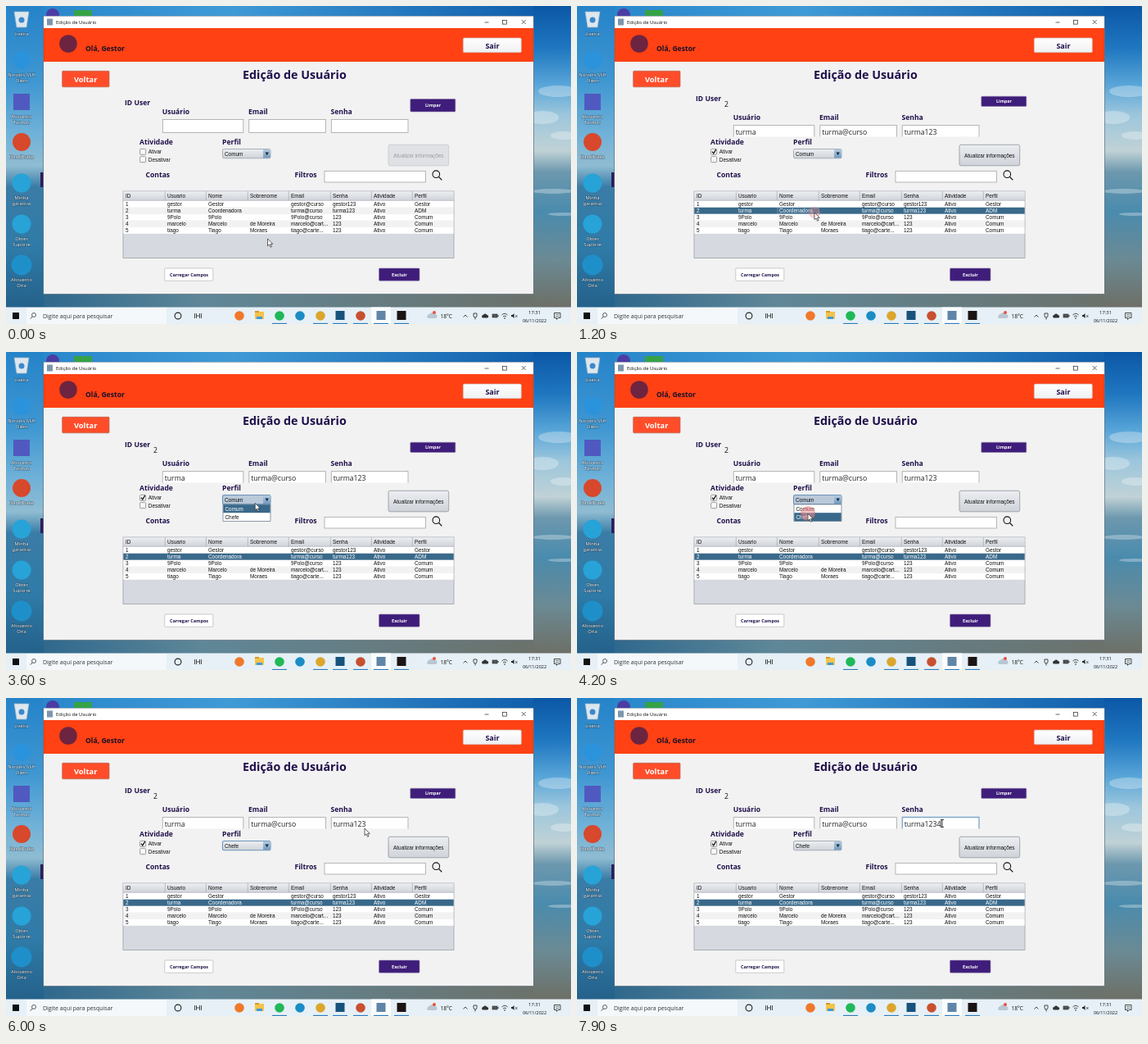
Animation of 690 by 388 pixels, one loop 8 s. Source, as an HTML page:

```html
<!DOCTYPE html>
<html lang="pt-BR">
<head>
<meta charset="utf-8">
<title>Edição de Usuário</title>
<style>
html, body { margin: 0; width: 100%; height: 100%; overflow: hidden; }
svg { display: block; width: 690px; height: 388px; }
text { font-family: "Open Sans", "Noto Sans", sans-serif; white-space: pre; }
.b { font-weight: bold; }
.s { font-family: "Liberation Sans", Arial, sans-serif; font-size: 6.4px; }
.m { text-anchor: middle; }
.d { text-anchor: middle; fill: #fff; font-size: 5.8px; paint-order: stroke; stroke: #1238; stroke-width: .9px; }
</style>
</head>
<body>
<svg viewBox="0 0 690 388">
  <defs>
    <linearGradient id="left" x2="0" y2="1">
      <stop stop-color="#2583c9"/><stop offset=".25" stop-color="#3f97d2"/>
      <stop offset=".42" stop-color="#6fb1d8"/><stop offset=".53" stop-color="#8fbcd2"/>
      <stop offset=".6" stop-color="#3a7ca6"/><stop offset=".8" stop-color="#2f7ba8"/>
      <stop offset="1" stop-color="#24618a"/>
    </linearGradient>
    <linearGradient id="right" x2="0" y2="1">
      <stop stop-color="#0b57a6"/><stop offset=".14" stop-color="#1f77c0"/>
      <stop offset=".26" stop-color="#58a5d8"/><stop offset=".36" stop-color="#9cc6dc"/>
      <stop offset=".48" stop-color="#c0d2d6"/><stop offset=".55" stop-color="#6d98ae"/>
      <stop offset=".68" stop-color="#4a8bad"/><stop offset=".84" stop-color="#6b8a94"/>
      <stop offset="1" stop-color="#6d6f66"/>
    </linearGradient>
    <linearGradient id="sky"><stop stop-color="#2583c9"/><stop offset=".4" stop-color="#3f9ad6"/><stop offset="1" stop-color="#0b57a6"/></linearGradient>
    <linearGradient id="shore"><stop stop-color="#24618a"/><stop offset=".35" stop-color="#5f8798"/><stop offset="1" stop-color="#6d6f66"/></linearGradient>
    <linearGradient id="btn" x2="0" y2="1"><stop stop-color="#fff"/><stop offset="1" stop-color="#eff0f2"/></linearGradient>
    <linearGradient id="grey" x2="0" y2="1"><stop stop-color="#eceef1"/><stop offset="1" stop-color="#cfd3d9"/></linearGradient>
    <linearGradient id="blue" x2="0" y2="1"><stop stop-color="#b4cce2"/><stop offset="1" stop-color="#6f9abf"/></linearGradient>
    <radialGradient id="press"><stop stop-color="#f6a0a0"/><stop offset=".7" stop-color="#f08488"/><stop offset="1" stop-color="#e8747c"/></radialGradient>
  </defs>
  <g id="base"></g>
  <g id="live"></g>
</svg>
<script>
const rect = (x, y, w, h, fill, more = '') =>
  `<rect x="${x}" y="${y}" width="${w}" height="${h}" fill="${fill}" ${more}/>`;
const text = (x, y, str, size, cls = '', fill = '#111') =>
  `<text x="${x}" y="${y}" class="${cls}" fill="${fill}" ${size ? `font-size="${size}"` : ''}>${str}</text>`;
const dot = (x, y, r, fill, more = '') => `<circle cx="${x}" cy="${y}" r="${r}" fill="${fill}" ${more}/>`;
const line = (d, color, w = .8) => `<path d="${d}" fill="none" stroke="${color}" stroke-width="${w}"/>`;
const edge = (color, w = .7, rx = 0) => `stroke="${color}" stroke-width="${w}" rx="${rx}"`;

const NAVY = '#20104a', PURPLE = '#3f1d7a';
const label = (x, y, str) => text(x, y, str, 8.6, 'b', NAVY);
const small = (x, y, str, fill) => text(x, y, str, 0, 's', fill);

const columns = [146, 197, 247, 298, 348, 399, 449, 499];
const heads = ['ID', 'Usuario', 'Nome', 'Sobrenome', 'Email', 'Senha', 'Atividade', 'Perfil'];
const rows = [
  ['1', 'gestor', 'Gestor', '', 'gestor@curso', 'gestor123', 'Ativo', 'Gestor'],
  ['2', 'turma', 'Coordenadora', '', 'turma@curso', 'turma123', 'Ativo', 'ADM'],
  ['3', '9Polo', '9Polo', '', '9Polo@curso', '123', 'Ativo', 'Comum'],
  ['4', 'marcelo', 'Marcelo', 'de Moreira', 'marcelo@cart...', '123', 'Ativo', 'Comum'],
  ['5', 'tiago', 'Tiago', 'Moraes', 'tiago@carte...', '123', 'Ativo', 'Comum']
];

function desktop() {
  const icons = [
    [66, 11, '#2a93dc', 'Nortalis SSH', 'Client'], [117, 10.5, '#5059c0', 'Altovento', 'Turmas'],
    [166, 11, '#d8482c', 'HandBrake'], [216, 11.5, '#27a3d8', 'Minha', 'garantia'],
    [266, 11.5, '#27a3d8', 'Obter', 'Suporte'], [316, 12.5, '#1f8fca', 'Altovento', 'Orla']
  ];
  return rect(0, 0, 690, 14, 'url(#sky)') + rect(0, 350, 690, 18, 'url(#shore)') +
    rect(0, 0, 46, 368, 'url(#left)') + rect(644, 0, 46, 368, 'url(#right)') +
    `<g fill="#fff" opacity=".3"><ellipse cx="674" cy="104" rx="24" ry="7"/><ellipse cx="655" cy="136" rx="20" ry="8"/>
     <ellipse cx="681" cy="158" rx="16" ry="5"/><ellipse cx="668" cy="226" rx="26" ry="3"/><ellipse cx="682" cy="254" rx="20" ry="2"/></g>` +
    dot(57, 11, 8, '#4b3da3') + rect(83, 5, 22, 7, '#35a246') +
    rect(42, 203, 4, 18, '#2c1c5c') +
    `<path d="M10 7h18l-3 19H13z" fill="#dde7ee" stroke="#9fb4c4" stroke-width=".7"/>` +
    dot(19, 17, 3.5, '#3b88cc') + text(19, 36, 'Lixeira', 0, 'd') +
    icons.map(([y, r, color, ...names]) => (color == '#5059c0' ? rect(9, y - 10, 20, 20, color) : dot(19, y, r, color)) +
      names.map((n, i) => text(19, y + 20 + i * 7, n, 0, 'd')).join('')).join('');
}

function taskbar() {
  const apps = [[285, '#f0782a'], [334, '#20b858', 1], [359, '#1c8cc4'], [384, '#dca62c', 1],
    [408, '#17527c', 1, 1], [433, '#c8502f', 1], [458, '#5f85a8', 1, 1], [483, '#1c1414', 1, 1]];
  return rect(0, 367.5, 690, 20.5, '#e6f0f6') + rect(25, 368, 171, 20, '#f4f8fb') +
    rect(8, 374, 8, 8, '#111') +
    dot(34, 377, 2.5, 'none', edge('#222')) + line('M32.2 379l-2.5 2.7', '#222') +
    text(45, 380.5, 'Digite aqui para pesquisar', 7, '', '#333') +
    dot(210, 378, 3.9, 'none', edge('#222', 1.1)) +
    line('M230.5 375v6m2-6v6m0-3h4m0-3v6m2-6v6', '#222') +
    rect(446, 367.5, 24, 20.5, '#fafcfd') +
    apps.map(([x, color, open, square]) => (square ? rect(x - 5.5, 372, 11, 11, color) : dot(x, 378, 5.8, color)) +
      (open ? rect(x - 9, 386.9, 18, 1.1, '#2b7cc0') : '')).join('') +
    rect(304, 373, 11, 9, '#f3c44c') + rect(304, 372, 5, 2, '#d99a24') + rect(306, 379, 7, 3, '#4299d8') +
    `<path d="M515 381a3 3 0 0 1 2-5 4 4 0 0 1 7 0 2.6 2.6 0 0 1 1 5z" fill="#b9c7d4"/>` + dot(523, 374, 2, '#e8523c') +
    text(530.5, 380.5, '18°C', 6.6) +
    line('M558.5 379.5l2.5-2.5 2.5 2.5M571 375h4v3a2 2 0 0 1-4 0zM573 380v2.5', '#222') +
    `<path d="M582 380.5a2 2 0 0 1 1-3.7 2.6 2.6 0 0 1 4.5.2 1.8 1.8 0 0 1 .5 3.5z" fill="#333"/>` +
    rect(594, 376, 6, 4, '#555', edge('#222', .6)) + rect(600.5, 377, 1, 2, '#222') +
    line('M605.5 377q3.5-3.5 7 0M607 379q2-2 4 0', '#222') + dot(609, 381, .8, '#222') +
    `<path d="M617 377h1.5l2-2v6l-2-2H617z" fill="#222"/>` + line('M622 377l2.5 3m0-3l-2.5 3', '#222', .6) +
    text(645.5, 375.8, '17:31', 5.8, 'm') + text(645.5, 386, '06/11/2022', 5.5, 'm') +
    line('M669.5 374.5h7.5v6h-3l-1.6 2v-2h-2.9z', '#222') + line('M671 376.5h4.5M671 378.5h4.5', '#222', .5);
}

function windowFrame() {
  return rect(45.7, 12.3, 598.6, 339.4, '#f2f2f2', edge('#44586a', .6)) +
    rect(46, 12.6, 598, 14.4, '#fff') + rect(50, 15.5, 7, 8, '#7d96ac') +
    text(61, 22.2, 'Edição de Usuário', 5.9) +
    line('M584.5 20h5M629.7 17l5 5m0-5l-5 5', '#222', .7) + rect(606.5, 17.3, 4.8, 4.8, 'none', edge('#222')) +
    rect(46, 27, 598, 41, '#ff4113') + dot(76, 46, 10.8, '#6d2440') +
    text(97, 55.4, 'Olá, Gestor', 8.6, 'b', '#1a1028') +
    rect(558.3, 39, 71, 17.7, 'url(#btn)', edge('#cfb4ac', .7, 1.5)) + text(594, 51.5, 'Sair', 9, 'b m', NAVY) +
    rect(68.7, 79.3, 57.3, 19.5, '#ff4d2a', edge('#b5654f', .7, 1)) + text(97.2, 92.6, 'Voltar', 9.4, 'b m', '#fff') +
    text(289, 89, 'Edição de Usuário', 14.3, 'b', NAVY) +
    rect(193.8, 320, 59, 15.3, '#fff', edge('#aaa', .6, 1)) + text(223.5, 329.8, 'Carregar Campos', 5.5, 'b m', NAVY) +
    rect(455.5, 320, 49.5, 15.3, PURPLE, edge('#8c7cab', .6, 1)) + text(480.5, 329.8, 'Excluir', 5.6, 'b m', '#fff') +
    label(163, 168.5, 'Atividade') + label(264, 168.5, 'Perfil') +
    label(170.5, 209, 'Contas') + label(352.5, 209, 'Filtros') +
    rect(389, 201.3, 123.5, 13.7, '#fff', edge('#999')) +
    dot(525.3, 205.2, 4.3, 'none', edge('#111', 1.1)) + line('M528.5 208.4l3.8 4', '#111', 1.3);
}

function table(picked, cellFocus) {
  return rect(143, 226, 404, 81.5, '#d6d9df', edge('#9297a1', .7)) +
    rect(143.3, 226.3, 403.4, 11, 'url(#grey)') + line('M143 237.3h404', '#a4a9b2', .6) +
    columns.map((x, i) => small(x, 234.3, heads[i]) + (i ? line(`M${x - 2.7} 226v11.3`, '#9ca1aa', .6) : '')).join('') +
    rows.map((row, i) => {
      const on = picked && i == 1, y = 237.8 + i * 8;
      return rect(143.4, y, 403.2, 8, on ? '#39698a' : i % 2 ? '#f2f2f2' : '#fff') +
        row.map((cell, c) => small(columns[c], y + 6.6, cell, on ? '#fff' : '#111')).join('');
    }).join('') +
    (cellFocus ? rect(245, 246.1, 50, 7.4, 'none', edge('#8fb0c8', .6)) : '');
}

function field(x, w, loaded, value, focus) {
  const color = focus ? '#7ea6cc' : '#999';
  if (!loaded) return rect(x, 138.6, w, 16, '#fff', edge(color));
  return rect(x, 145.5, w, 14, '#fff') + line(`M${x} 159.5v-14h${w}v14`, color, focus ? 1.3 : .7) +
    text(x + 2.4, 157, value, 8.7, '', '#222');
}

function check(y, name, on) {
  return rect(163.6, y, 7, 7, 'url(#btn)', edge('#777', .7, 1)) + small(173.8, y + 6, name) +
    (on ? line(`M165 ${y + 3.3}l1.8 2.2 3-5`, '#111', 1.2) : '');
}

function combo(value, focus, open) {
  return rect(264.5, 174.5, 58.5, 11.3, open ? '#b9c9d9' : 'url(#grey)', edge(focus ? '#6b93b8' : '#8b94a0', focus ? 1.1 : .7, 1.8)) +
    rect(314, 174.9, 8.7, 10.5, 'url(#blue)') + `<path d="M316.5 178.6h4.4l-2.2 3.6z" fill="#1c2a38"/>` +
    small(267, 182.7, value);
}

const popup = hover => rect(265, 186, 58, 20.5, '#fff', edge('#5f7388', .7)) +
  ['Comum', 'Chefe'].map((name, i) => (hover == i ? rect(265.3, 186.2 + i * 10, 57.4, 10, '#39698a') : '') +
    small(267.5, 193.6 + i * 10, name, hover == i ? '#fff' : '#111')).join('');

// time, x, y of the pointer
const path = [[0, 319.5, 284], [100, 319.5, 284], [700, 290, 252], [2500, 290, 252], [2900, 330.5, 196],
  [3200, 312, 180], [3500, 312, 180], [3800, 282, 197], [4400, 282, 197], [4800, 339, 201],
  [5400, 339, 201], [6000, 438, 159], [6200, 445, 153], [6300, 445, 153], [6400, 446, 153], [8000, 446, 153]];
const presses = [900, 3200, 4000, 4900, 6700];

function pointer(t) {
  const i = path.findIndex(p => p[0] > t), [t0, x0, y0] = path[i - 1], [t1, x1, y1] = path[i];
  const k = (t - t0) / (t1 - t0), e = k * k * (3 - 2 * k);
  return [x0 + (x1 - x0) * e, y0 + (y1 - y0) * e];
}

function scene(t) {
  const [x, y] = pointer(t);
  const picked = t >= 1000, loaded = t >= 1100, open = t >= 3500 && t < 4300;
  const typing = t >= 6800, typed = t >= 7500;
  const shift = loaded ? 7 : 0, lift = loaded ? 5 : 0;
  const age = t - (presses.findLast(p => p <= t) ?? -999);
  let out = label(145, 121 - lift, 'ID User') + (loaded ? text(180, 123.2, '2', 8.7) : '') +
    rect(493.8, loaded ? 110.2 : 113.5, 55, loaded ? 12.3 : 15.5, PURPLE, edge('#8c7cab', .6, 1)) +
    text(521.5, 123.3 - lift, 'Limpar', 5.4, 'b m', '#fff') +
    label(190.7, 132 + shift, 'Usuário') + label(296, 132 + shift, 'Email') + label(396.5, 132 + shift, 'Senha') +
    field(191.3, 98.5, loaded, 'turma') + field(296.8, 93.7, loaded, 'turma@curso') +
    field(397.3, 93.7, loaded, typed ? 'turma1234' : 'turma123', typing) +
    check(174.4, 'Ativar', loaded) + check(183.7, 'Desativar') +
    combo(t < 4300 ? 'Comum' : 'Chefe', t >= 3300 && !typing, open) +
    rect(467, 169.3, 73.7, 25.5, loaded ? 'url(#grey)' : '#dfe1e5', edge(loaded ? '#8e949d' : '#c4c8ce', .8, 2)) +
    text(503.8, 184.5, 'Atualizar informações', 0, 's m', loaded ? '#111' : '#9a9da3') +
    table(picked, picked && t < 3300);
  if (open) out += popup(y > 196 ? 1 : 0);
  if (typing && (t < 7300 || typed)) out += line(`M${typed ? 444.7 : 440} 148v10`, '#111', .6);
  if (age < 400) out += dot(x, y, 12.5 - age * .018, 'url(#press)', `opacity="${.92 - age * .0018}"`);
  const beam = x > 398 && x < 490 && y > 146 && y < 158.5;
  return out + (beam ? line(`M${x - 2} ${y - 4.5}h4m-2 0v9m-2 0h4`, '#111', .8)
    : `<path transform="translate(${x} ${y})" d="M0 0v8.8l2-1.9 1.5 3.3 1.5-.6-1.5-3.2h2.8z" fill="#fff" stroke="#222" stroke-width=".7"/>`);
}

const layer = id => document.getElementById(id);
layer('base').innerHTML = desktop() + windowFrame() + taskbar();
const start = performance.now();
let last = -1;
function tick() {
  const t = Math.floor((performance.now() - start) % 8000 / 100) * 100;
  if (t != last) layer('live').innerHTML = scene(last = t);
  requestAnimationFrame(tick);
}
tick();
</script>
</body>
</html>
```
